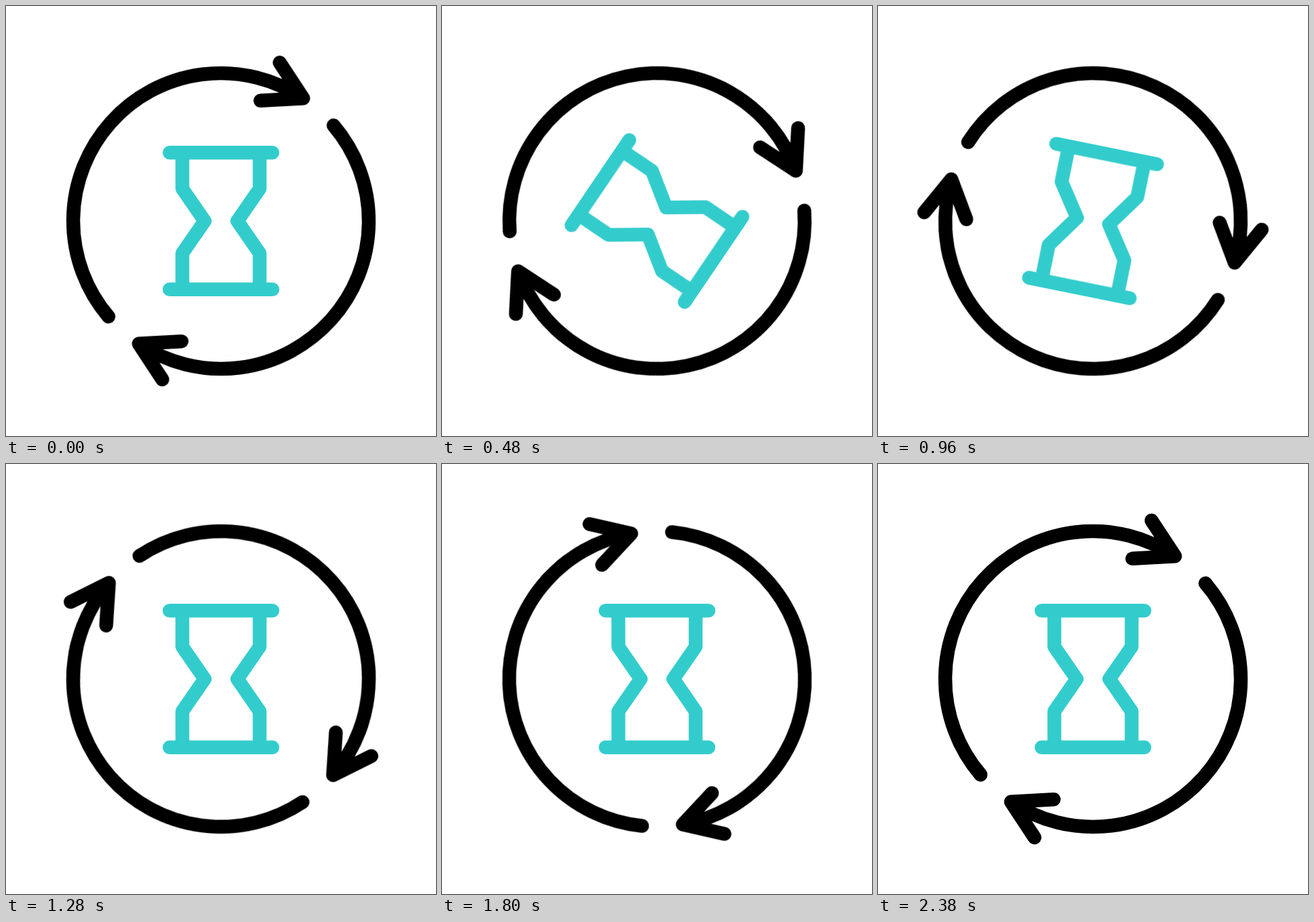
Write an HTML page that moves like this. It is 640 by 640 pixels and loops after 2.4 s.

```html
<!DOCTYPE html>
<html lang="en">
<head>
<meta charset="utf-8">
<title>Hourglass cycle</title>
<style>
  html, body { margin: 0; width: 100%; height: 100%; overflow: hidden; background: #fff; }
  svg { display: block; width: 100vw; height: 100vh; }
  g { fill: none; stroke-width: 20.5; stroke-linecap: round; stroke-linejoin: round; }
  #ring { stroke: #000; }
  #glass { stroke: #33cccc; }
</style>
</head>
<body>
<svg viewBox="-320 -320 640 640">
  <defs>
    <path id="arrow" d="M-167.3 142.5A219.75 219.75 0 0 1 122.1 -182.8M87 -236L122.1 -182.8L58.4 -179.2"/>
    <path id="half" d="M-76.6 -101.7H76.6M-57.5 -101.7V-48L-24.3 0L-57.5 48V101.7"/>
  </defs>
  <g id="ring">
    <use href="#arrow"/>
    <use href="#arrow" transform="rotate(180)"/>
  </g>
  <g id="glass">
    <use href="#half"/>
    <use href="#half" transform="rotate(180)"/>
  </g>
</svg>
<script>
  const LOOP = 2400;

  // steps: [time in ms, angle in degrees, easing to the next step]
  function spin(id, steps) {
    const frames = steps.map(([time, angle, easing = "linear"]) => ({
      offset: time / LOOP,
      transform: `rotate(${angle}deg)`,
      easing
    }));
    document.getElementById(id).animate(frames, { duration: LOOP, iterations: Infinity });
  }

  spin("ring", [[0, 0], [2380, 180], [LOOP, 180]]);
  spin("glass", [[0, 0, "cubic-bezier(.5, 0, .5, 1)"], [1200, -180], [LOOP, -180]]);
</script>
</body>
</html>
```
